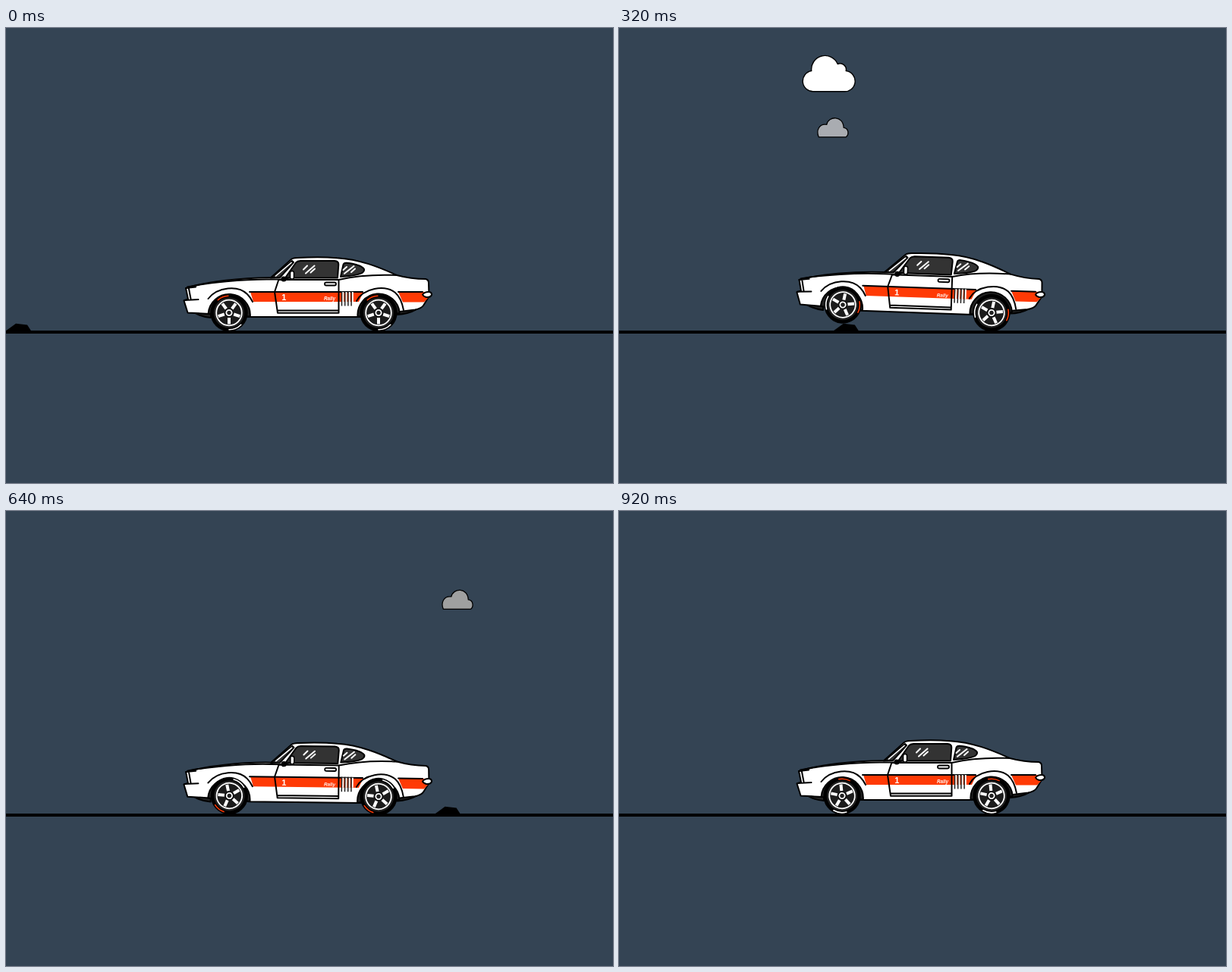
These frames come from a looping animation (800 by 600 pixels, 960 ms). An HTML page:

```html
<!DOCTYPE html>
<html lang="en">
<head>
<meta charset="utf-8">
<title>Car over a bump</title>
<style>
html, body { margin: 0; width: 100%; height: 100%; overflow: hidden; background: #344454; }
svg { display: block; width: 800px; height: 600px; }
.ink { stroke: #000; stroke-width: 2; stroke-linejoin: round; stroke-linecap: round; }
.line { fill: none; }
.white { fill: #fff; }
.glass { fill: #333; }
.dark { fill: #222; }
.red { fill: #ff3a05; }
.glint { fill: none; stroke: #fff; stroke-width: 2; stroke-linecap: round; }
text { fill: #fff; font-family: "Liberation Sans", Arial, sans-serif; font-weight: 700; }
</style>
</head>
<body>
<svg viewBox="0 0 800 600">
  <defs>
    <g id="wheel">
      <circle r="24.7"/>
      <circle r="20" class="dark"/>
      <g id="marks" fill="none" stroke-width="1.6" stroke-linecap="round"></g>
      <circle r="16.8" fill="#1c1c1c" stroke="#fff" stroke-width="1.8"/>
      <g id="spokes" stroke="#fff" stroke-width="4"></g>
      <circle r="5.6"/>
      <circle r="3.7" fill="#222" stroke="#fff" stroke-width="1.8"/>
    </g>
  </defs>
  <rect width="800" height="600" fill="#344454"/>

  <path id="big" class="ink white" style="stroke-width:1.4"
    d="M14 48.7A13.7 13.7 0 0 1 11 21.5A18 18 0 0 1 45.5 12.5A8 8 0 0 1 56.5 21.5A13.7 13.7 0 0 1 53 48.7Z"/>
  <path id="small" class="ink" style="stroke-width:1.3"
    d="M2.3 25.5C-1.5 17 3 7.5 12.8 9C15 -2.5 34.5 -3.5 35.2 13C42 14 42.5 22 38.3 25.5Z"/>

  <rect y="399" width="800" height="4"/>
  <path id="bump" d="M-1 400L13 389.8L28 391.5L33.5 400Z"/>

  <g id="body">
    <path class="ink dark" d="M249 376L270 376V382Q258 381 249 376ZM516 373L541 371Q530 377 516 378Z"/>
    <path class="ink white" d="M237 343C262 335 310 329 349 329.2L376 305Q378 303.3 384 303C402 302 422 302 436 303.2C466 305 491 315 515 326C530 330 544 331 553 331Q557 332 557 336L557.5 354L550 366Q547 370 539 371.5L519 374L467 381H320L268 377L239.5 375.5L234.5 359.5L240 357.5Z"/>
    <path class="red" d="M322 348H471L465 361H326ZM517 348H557V355L551 361.5H523Z"/>
    <path class="ink line" d="M321 348H470M517 348H549"/>

    <path class="ink dark" d="M266.5 377A27.7 27.7 0 0 1 321.8 380.5ZM463.5 380.5A27.7 27.7 0 0 1 518.8 376Z"/>
    <path class="ink line" d="M266.5 357C279 341 306 339 318 351Q322 355 325 361M462 360C471 343 499 338 513 349Q521 356 524 372"/>

    <path class="ink line" d="M241 344L243.5 357M235 359L253.5 358M237 343L250 341.5M239 341.5C266 336 312 331 349 331.5H368"/>
    <path class="ink glass" d="M349 329.5L377 307L379 309L361 329Z"/>
    <path fill="none" stroke="#fff" stroke-width="1.6" d="M355 327.5L376.5 309"/>

    <path class="ink line" d="M359 333L354 348L358 375.7H438.5V332M358 372.5H438M359 332H438.5C462 326.5 492 325 515 326"/>
    <path class="ink glass" d="M368 329.5L382 309.5Q384 307.2 388 307H433Q438.5 307.5 438.3 312L437 329.5Z"/>
    <path class="ink glass" d="M441 328L444.5 312Q445.3 309.5 449 309.8C460 311 469 313.5 472 318Q472.5 321.5 468 323.7Q460 327 441 328Z"/>
    <path class="glint" d="M392 318.5L397 313.5M395 323.5L406.5 313.5M401.5 322.5L407 317.5M444.5 319L449 315M446 323.8L458.5 314M455 322L460 317.5"/>
    <circle cx="366" cy="331" r="3.6"/>
    <path class="ink line" d="M366 331L376 329"/>
    <rect class="ink white" x="374.5" y="320.5" width="5" height="10.5" rx="2.3" style="stroke-width:1.6"/>
    <rect class="ink white" x="420" y="335.5" width="15" height="4" rx="2" style="stroke-width:1.8"/>

    <g id="vents"></g>
    <text x="363.3" y="359" font-size="11">1</text>
    <text x="419" y="359.2" font-size="6.3" font-style="italic">Rally</text>
    <path class="ink white" d="M549 351.5Q552 347.5 558 348Q561.5 349 561 352Q559.5 355.5 554 355Q550 354 549 351.5Z"/>
  </g>
  <g id="front"><use href="#wheel"/></g>
  <g id="rear"><use href="#wheel"/></g>
</svg>
<script>
const LOOP = 960, STEP = 40;
const $ = id => document.getElementById(id);
const rad = deg => deg * Math.PI / 180;

// angle runs clockwise from the top
const polar = (r, deg) =>
  (r * Math.sin(rad(deg))).toFixed(2) + ' ' + (-r * Math.cos(rad(deg))).toFixed(2);
const arc = (r, from, to, color) =>
  `<path stroke="${color}" d="M${polar(r, from)}A${r} ${r} 0 0 1 ${polar(r, to)}"/>`;

$('marks').innerHTML = arc(22.3, -41, -3, '#ff3a05') + arc(22.3, 135, 180, '#fff');
$('spokes').innerHTML = [0, 1, 2, 3, 4]
  .map(k => `<path d="M${polar(6.5, 180 + 72 * k)}L${polar(15, 180 + 72 * k)}"/>`).join('');
$('vents').innerHTML = [442.5, 446.7, 450.9, 455.1]
  .map(x => `<path stroke="#fff" stroke-width="2" d="M${x + 1.7} 348V361"/>` +
    `<path stroke="#222" stroke-width="1.5" d="M${x} 347V366.5"/>`).join('');

// piecewise linear value from [step, value] pairs
function track(keys, n) {
  if (n <= keys[0][0]) return keys[0][1];
  for (let i = 1; i < keys.length; i++) {
    const [a, u] = keys[i - 1], [b, v] = keys[i];
    if (n <= b) return u + (v - u) * (n - a) / (b - a);
  }
  return keys[keys.length - 1][1];
}

const tilt = [[6, 0], [8, 2], [13, 1], [16, 0.7], [18, 0]];
const sink = [[13, 0], [16, 5], [18, 0]];
const frontLift = [[6, 0], [8, -10.5], [13, -6.7], [15, 0]];
const rearLift = [[11, 0], [13, -6], [16, 1], [18, -4], [20, 0]];
const fade = [
  [[13, 169], [16, 159], [18, 134], [22, 84]],
  [[13, 172], [16, 160], [18, 134], [22, 88]],
  [[13, 177], [16, 160], [18, 134], [22, 92]]
];

const place = (id, x, y, turn = 0) =>
  $(id).setAttribute('transform', `translate(${x} ${y}) rotate(${turn})`);

function draw(ms) {
  const n = Math.floor((ms % LOOP) / STEP);
  place('bump', 35.35 * n, 0);
  place('small', 39.15 * n - 52.3, 132.6 - 1.79 * n);
  $('small').setAttribute('fill', `rgb(${fade.map(k => Math.round(track(k, n)))})`);
  place('big', 78.5 * n - 385.3, 38.2 - 0.4 * n);
  $('body').setAttribute('transform',
    `translate(0 ${track(sink, n)}) rotate(${track(tilt, n)} 555 350)`);
  place('front', 294 + track(tilt, n) / 2, 375.5 + track(frontLift, n), -30 * n);
  place('rear', 491, 375.5 + track(rearLift, n), -30 * n);
}

const start = performance.now();
function tick() {
  draw(performance.now() - start);
  requestAnimationFrame(tick);
}
tick();
</script>
</body>
</html>
```
